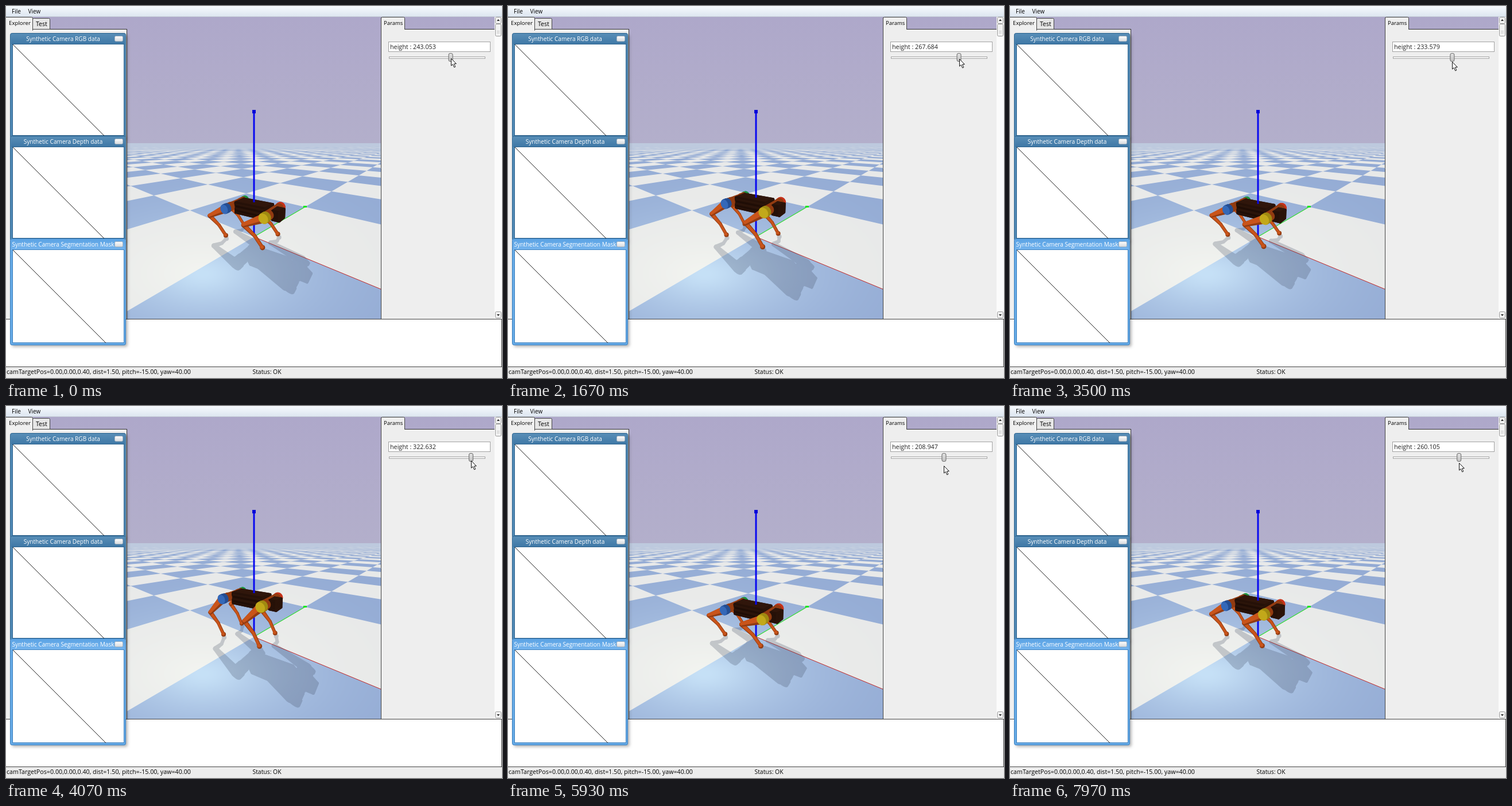
Animation, 864 px wide and 648 px high, one loop 8.01 s. Source, as an HTML page with a canvas:

```html
<!DOCTYPE html>
<html lang="en">
<head>
<meta charset="utf-8">
<title>Robot height slider</title>
<style>
html, body { margin: 0; width: 100%; height: 100%; overflow: hidden; background: #fff; }
canvas { display: block; }
</style>
</head>
<body>
<canvas id="stage" width="864" height="648"></canvas>
<script>
const W = 864, H = 648, LOOP = 8010;
const VIEW = { x: 211, y: 19, w: 442, h: 526 };
const FONT = '"Open Sans", "Noto Sans", sans-serif';
const ctx = document.getElementById('stage').getContext('2d');

function layer() {
  const c = document.createElement('canvas');
  c.width = W; c.height = H;
  return c.getContext('2d');
}

// ---------- camera: yaw 40, pitch -15, distance 1.5, target (0, 0, 0.4)
const F = 324, DEG = Math.PI / 180;
const sy = Math.sin(40 * DEG), cy = Math.cos(40 * DEG);
const sp = Math.sin(15 * DEG), cp = Math.cos(15 * DEG);
const eye = [1.5 * cp * sy, -1.5 * cp * cy, 0.4 + 1.5 * sp];
const fwd = [-cp * sy, cp * cy, -sp];
const right = [cy, sy, 0];
const up = [-sp * sy, sp * cy, cp];
const dot = (a, b) => a[0] * b[0] + a[1] * b[1] + a[2] * b[2];

function project(p) {
  const d = [p[0] - eye[0], p[1] - eye[1], p[2] - eye[2]];
  const s = F / dot(d, fwd);
  return { x: W / 2 + s * dot(d, right), y: H / 2 - s * dot(d, up), s };
}

function ground(px, py) {
  const a = (px - W / 2) / F, b = (H / 2 - py) / F;
  const dir = fwd.map((f, i) => f + a * right[i] + b * up[i]);
  if (dir[2] > -0.004) return null;
  const t = -eye[2] / dir[2];
  return [eye[0] + t * dir[0], eye[1] + t * dir[1]];
}

// ---------- static picture
const fract = v => v - Math.floor(v);
const wave = (v, w) =>
  2 * (Math.abs(fract((v - w / 2) / 2) - 0.5) - Math.abs(fract((v + w / 2) / 2) - 0.5)) / w;
const WHITE = [231, 232, 232], BLUE = [145, 168, 210], GLOW = [58, 62, 40];

function paintFloor(g) {
  const img = g.getImageData(VIEW.x, 236, VIEW.w, 309);
  for (let j = 0; j < 309; j++) for (let i = 0; i < VIEW.w; i++) {
    const px = VIEW.x + i + 0.5, py = 236.5 + j;
    const p = ground(px, py);
    if (!p || py < 239.5) continue;
    const q = ground(px + 1, py), r = ground(px, py + 1);
    const wx = Math.max(Math.abs(q[0] - p[0]), Math.abs(r[0] - p[0]));
    const wy = Math.max(Math.abs(q[1] - p[1]), Math.abs(r[1] - p[1]));
    const k = 0.5 - 0.5 * wave(p[0], wx) * wave(p[1], wy);
    const glow = Math.exp(-Math.hypot((px - 342) / 135, (py - 466) / 70, 0.3) + 0.2);
    const o = 4 * (j * VIEW.w + i);
    for (let c = 0; c < 3; c++)
      img.data[o + c] = WHITE[c] + (BLUE[c] - WHITE[c]) * k + GLOW[c] * glow * (0.2 + 0.8 * k);
  }
  g.putImageData(img, VIEW.x, 236);
}

function rect(g, x, y, w, h, fill, stroke) {
  g.fillStyle = fill;
  g.fillRect(x, y, w, h);
  if (stroke) {
    g.strokeStyle = stroke;
    g.lineWidth = 1;
    g.strokeRect(x + 0.5, y + 0.5, w - 1, h - 1);
  }
}

function roundRect(g, x, y, w, h, r, fill, stroke) {
  g.beginPath();
  g.roundRect(x, y, w, h, r);
  g.fillStyle = fill;
  g.fill();
  if (stroke) { g.strokeStyle = stroke; g.lineWidth = 1; g.stroke(); }
}

function line(g, x0, y0, x1, y1, color, width = 1) {
  g.strokeStyle = color;
  g.lineWidth = width;
  g.beginPath();
  g.moveTo(x0, y0);
  g.lineTo(x1, y1);
  g.stroke();
}

function text(g, s, x, y, size, color = '#000', align = 'left') {
  g.font = `${size}px ${FONT}`;
  g.textAlign = align;
  g.fillStyle = color;
  g.fillText(s, x, y);
}

function ramp(g, y0, y1, a, b) {
  const r = g.createLinearGradient(0, y0, 0, y1);
  r.addColorStop(0, a);
  r.addColorStop(1, b);
  return r;
}

function cameraWindow(g, title, y, h, active) {
  const edge = active ? '#3b7fbe' : '#2f6590';
  const frame = active ? '#66aae6' : '#5089b4';
  const bar = active ? ramp(g, y, y + 19, '#5aa2e4', '#74b4ee') : ramp(g, y, y + 19, '#5a8fb8', '#3f78a6');
  g.save();
  g.shadowColor = 'rgba(0,0,0,.3)';
  g.shadowBlur = 5;
  g.shadowOffsetX = g.shadowOffsetY = 3;
  roundRect(g, 7.5, y + 0.5, 201, h, 3, frame);
  g.restore();
  roundRect(g, 7.5, y + 0.5, 201, h, 3, frame, edge);
  rect(g, 9, y + 2, 198, 18, bar);
  rect(g, 11, y + 19, 195, h - 22, '#fff', edge);
  const side = h - 23;
  line(g, 12, y + 20, 12 + side, y + 20 + side, '#222');
  text(g, title, 99.5, y + 13.5, 10.1, '#fff', 'center');
  roundRect(g, 189.5, y + 5.5, 14, 9, 2, ramp(g, y + 5, y + 15, '#fff', '#d4d8dc'), '#a8b4c0');
}

function arrowButton(g, y, dir) {
  roundRect(g, 852.5, y + 0.5, 10, 11, 2, '#f0f0f0', '#999');
  g.fillStyle = '#222';
  g.beginPath();
  g.moveTo(855, y + 6 - dir);
  g.lineTo(860, y + 6 - dir);
  g.lineTo(857.5, y + 6 + 2 * dir);
  g.fill();
}

function buildScene() {
  const g = layer();
  rect(g, 0, 0, W, H, '#fff');
  rect(g, 0, 19, 851, 526, ramp(g, 19, 240, '#aea8ca', '#b3afcb'));
  paintFloor(g);

  // axes on the floor
  const o = project([0, 0, 0]), x = project([1, 0, 0]), y = project([0, 1, 0]);
  line(g, o.x, o.y, x.x, x.y, '#c02828');
  line(g, o.x, o.y, y.x, y.y, '#30dc30', 1.2);
  rect(g, y.x - 3, y.y - 2, 6, 3, '#10e810');

  rect(g, 0, 0, W, 18, ramp(g, 0, 18, '#f6f9fd', '#dde6f0'));
  rect(g, 0, 18, W, 1, '#c4ccd6');
  text(g, 'File', 10, 13, 10);
  text(g, 'View', 38.5, 13, 10);

  // left panel
  rect(g, 0, 40, 211, 505, '#f0f0f0');
  line(g, 46, 40.5, 211, 40.5, '#333');
  line(g, 210.5, 40, 210.5, 545, '#333');
  roundRect(g, 46.5, 21.5, 30, 19, [2, 2, 0, 0], '#e6e6e6', '#444');
  roundRect(g, -0.5, 19.5, 47, 23, [0, 2, 0, 0], '#f0f0f0', '#444');
  rect(g, 0, 40, 46, 4, '#f0f0f0');
  text(g, 'Explorer', 5, 33, 9.7);
  text(g, 'Test', 52, 34.5, 10.6);

  // right panel
  rect(g, 653, 40, 198, 505, '#eeeeee');
  line(g, 694, 40.5, 851, 40.5, '#333');
  roundRect(g, 653.5, 19.5, 41, 23, [2, 2, 0, 0], '#eeeeee', '#444');
  rect(g, 654, 41, 42, 3, '#eeeeee');
  line(g, 653.5, 20, 653.5, 545, '#444');
  text(g, 'Params', 658, 33, 9.5);
  rect(g, 666, 62, 178, 18, '#fff', '#a2a2a2');
  rect(g, 667, 88, 168, 4, '#f8f8f8', '#a6a6a6');

  // scroll bar
  rect(g, 851, 19, 13, 527, '#fbfbfb');
  arrowButton(g, 19, -1);
  arrowButton(g, 532, 1);
  roundRect(g, 852.5, 31.5, 10, 21, 2, '#f2f2f2', '#999');
  for (let k = 0; k < 3; k++) line(g, 855, 43.5 + 2 * k, 860, 43.5 + 2 * k, '#d0d0d0');

  // bottom panel and status bar
  rect(g, -1, 545, W + 1, 84, '#fff', '#444');
  rect(g, 0, 629, W, 19, '#ececec');
  text(g, 'camTargetPos=0.00,0.00,0.40, dist=1.50, pitch=-15.00, yaw=40.00', 1, 641, 10.7);
  text(g, 'Status: OK', 429.5, 641, 10.4);

  cameraWindow(g, 'Synthetic Camera RGB data', 47, 182, false);
  cameraWindow(g, 'Synthetic Camera Depth data', 226, 182, false);
  cameraWindow(g, 'Synthetic Camera Segmentation Mask', 405, 185, true);
  return g.canvas;
}

// ---------- motion: time, slider value, pointer height
const KEYS = [
  [-500, 197, 94], [0, 243, 92], [400, 292, 92], [800, 325, 92], [1150, 308, 92], [1670, 267.7, 93],
  [2200, 217, 96], [2770, 201.4, 99], [3300, 208, 99], [3700, 265, 97], [4070, 322.6, 96],
  [4300, 330, 96], [4700, 330, 98], [5030, 321, 100], [5500, 258, 103], [5930, 209, 105],
  [6600, 210, 106], [7000, 194, 106], [7270, 190, 106], [7530, 206, 104], [7970, 260.1, 100], [8200, 287, 99]
];

function track(t, col) {
  let i = 1;
  while (i < KEYS.length - 2 && t >= KEYS[i + 1][0]) i++;
  if (t < 0) i = 0;
  const at = n => KEYS[Math.max(0, Math.min(KEYS.length - 1, n))];
  const a = at(i - 1), b = at(i), c = at(i + 1), d = at(i + 2);
  const span = c[0] - b[0], u = (t - b[0]) / span;
  const mb = (c[col] - a[col]) / (c[0] - a[0]) * span;
  const mc = (d[col] - b[col]) / (d[0] - b[0]) * span;
  const u2 = u * u, u3 = u2 * u;
  return (2 * u3 - 3 * u2 + 1) * b[col] + (u3 - 2 * u2 + u) * mb +
         (3 * u2 - 2 * u3) * c[col] + (u3 - u2) * mc;
}

// ---------- robot
const YAW = 8 * DEG, UPPER = 0.205, LOWER = 0.222;
const ORANGE = ['#c9541a', '#933c12'];
let g3, shadow, drift;

function place(x, y, z) {
  let wx = x * Math.cos(YAW) - y * Math.sin(YAW) + drift;
  let wy = x * Math.sin(YAW) + y * Math.cos(YAW);
  if (shadow) { wx += 1.17 * z; wy -= 0.73 * z; z = 0; }
  return project([wx, wy, z]);
}

function poly(points, fill) {
  g3.fillStyle = g3.strokeStyle = shadow ? '#3c465c' : fill;
  g3.beginPath();
  points.forEach(p => g3.lineTo(p.x, p.y));
  g3.closePath();
  g3.fill();
}

function taper(a, b, ra, rb, fill) {
  const t = Math.atan2(b.y - a.y, b.x - a.x), h = Math.PI / 2;
  g3.fillStyle = shadow ? '#3c465c' : fill;
  g3.beginPath();
  g3.arc(a.x, a.y, ra, t + h, t - h);
  g3.arc(b.x, b.y, rb, t - h, t + h);
  g3.fill();
}

// joints: list of [point, radius]; dark rim first, lit core on top
function limb(joints) {
  const pts = joints.map(([p, r]) => {
    const v = place(...p);
    return { x: v.x, y: v.y, r: r * v.s };
  });
  const pass = (k, fill) => {
    const at = v => ({ x: v.x - (1 - k) * 0.7 * v.r, y: v.y - (1 - k) * 0.8 * v.r });
    for (let i = 1; i < pts.length; i++)
      taper(at(pts[i - 1]), at(pts[i]), pts[i - 1].r * k, pts[i].r * k, fill);
  };
  pass(1, ORANGE[1]);
  if (!shadow) pass(0.7, ORANGE[0]);
}

function disc(x, y, z, r, fill) {
  const pts = [];
  for (let k = 0; k < 20; k++) {
    const a = k * Math.PI / 10;
    pts.push(place(x + r * Math.cos(a), y, z + r * Math.sin(a)));
  }
  poly(pts, fill);
}

function drum(x, y0, y1, z, r, [face, rim]) {
  for (let k = 0; k < 8; k++) disc(x, y0 + (y1 - y0) * k / 8, z, r, rim);
  disc(x, y1, z, r * 0.96, face);
}

function box(x0, x1, y0, y1, z0, z1, top, side, front) {
  const face = (list, fill) => {
    poly(list.map(n => place(n & 1 ? x1 : x0, n & 2 ? y1 : y0, n & 4 ? z1 : z0)), fill);
    g3.lineWidth = 5;
    g3.lineJoin = 'round';
    g3.stroke();
  };
  face([0, 1, 3, 2], side);
  face([0, 2, 6, 4], side);
  face([2, 3, 7, 6], side);
  face([4, 5, 7, 6], top);
  face([0, 1, 5, 4], side);
  face([1, 3, 7, 5], front);
}

function leg(hx, fx, y, hz) {
  const dx = fx - hx, dz = 0.018 - hz, d = Math.hypot(dx, dz);
  const along = (UPPER ** 2 - LOWER ** 2 + d * d) / (2 * d);
  const off = Math.sqrt(Math.max(0, UPPER ** 2 - along ** 2));
  const knee = [hx + (dx * along + dz * off) / d, y, hz + (dz * along - dx * off) / d];
  const foot = [fx, y * 0.94, 0.018];
  const shin = [(knee[0] + fx) / 2 + 0.014, y * 0.97, knee[2] / 2 + 0.017];
  limb([[knee, 0.019], [shin, 0.014], [foot, 0.014]]);
  limb([[[hx, y, hz], 0.034], [knee, 0.019]]);
  limb([[foot, 0.02], [foot, 0.02]]);
}

function robot(hz) {
  const FRONT = 0.175, REAR = -0.187;
  const motor = (x, near, colors) => {
    if (near) {
      drum(x, -0.065, -0.115, hz, 0.038, ORANGE);
      drum(x, -0.115, -0.157, hz, 0.041, colors);
    } else {
      drum(x, 0.15, 0.12, hz, 0.041, colors);
      drum(x, 0.12, 0.06, hz, 0.038, ORANGE);
    }
  };
  leg(REAR, -0.195, 0.135, hz);
  motor(REAR, false, ['#24b050', '#1c9442']);
  leg(FRONT, 0.168, 0.13, hz);
  motor(FRONT, false, ['#c42a1a', '#c8341c']);
  drum(REAR, 0.06, -0.065, hz, 0.036, ORANGE);
  box(-0.14, 0.14, -0.062, 0.062, hz - 0.047, hz + 0.038, '#30160b', '#261108', '#2a1309');
  if (!shadow) for (let k = 0; k < 4; k++) {
    const z = hz - 0.03 + k * 0.019;
    const a = place(-0.14, -0.064, z), b = place(0.13, -0.064, z);
    line(g3, a.x, a.y, b.x, b.y, k % 2 ? '#2f170c' : '#1b0b05', 1.5);
  }
  drum(FRONT, 0.06, -0.065, hz, 0.038, ORANGE);
  box(0.19, 0.245, -0.038, 0.048, hz - 0.046, hz + 0.022, '#30160b', '#261108', '#2a1309');
  leg(REAR, -0.2, -0.143, hz);
  motor(REAR, true, ['#3468b8', '#254f94']);
  leg(FRONT, 0.16, -0.143, hz);
  motor(FRONT, true, ['#c2a81a', '#a08a12']);
}

// ---------- moving parts
const scene = buildScene();
const shade = layer();

function drawView(t) {
  const hz = track(t - 80, 1) / 1000 + 0.029;
  drift = -0.042 * Math.pow(t / LOOP, 0.55);
  ctx.save();
  ctx.beginPath();
  ctx.rect(VIEW.x, VIEW.y, VIEW.w, VIEW.h);
  ctx.clip();

  shade.clearRect(0, 0, W, H);
  g3 = shade;
  shadow = true;
  robot(hz);
  ctx.globalAlpha = 0.24;
  ctx.drawImage(shade.canvas, 0, 0);
  ctx.globalAlpha = 1;

  const base = project([0, 0, 0]), tip = project([0, 0, 1]), lid = project([0, 0, hz + 0.049]);
  line(ctx, 432, base.y, 432, lid.y, '#0808f0', 3);
  g3 = ctx;
  shadow = false;
  robot(hz);
  line(ctx, 432, lid.y, 432, tip.y, '#0808f0', 3);
  rect(ctx, 429, 181, 6, 6, '#0808d8');
  ctx.restore();
}

const ARROW = [[0, 0], [0, 12.5], [2.8, 10], [5.2, 15.3], [7.3, 14.4], [5, 9.3], [8.8, 9]];

function drawParams(t) {
  const step = 36 / 19;
  const value = 190 + Math.round((track(t, 1) - 190) / step) * step;
  const x = 751 + (value - 190) * 0.445;
  text(ctx, `height : ${value.toFixed(3)}`, 669, 74.5, 10.75, '#222');
  roundRect(ctx, x - 3.5, 82.5, 7, 14, 2.5, ramp(ctx, 82, 97, '#e4e4e4', '#c0c0c0'), '#666');

  ctx.save();
  ctx.translate(Math.round(x) + 0.5, Math.round(track(t, 2)) - 0.5);
  ctx.beginPath();
  ARROW.forEach(p => ctx.lineTo(p[0], p[1]));
  ctx.closePath();
  ctx.fillStyle = '#fff';
  ctx.fill();
  ctx.strokeStyle = '#111';
  ctx.lineWidth = 1;
  ctx.stroke();
  ctx.restore();
}

const start = performance.now();
function frame() {
  const t = (performance.now() - start) % LOOP;
  ctx.drawImage(scene, 0, 0);
  drawView(t);
  drawParams(t);
  requestAnimationFrame(frame);
}
frame();
</script>
</body>
</html>
```
